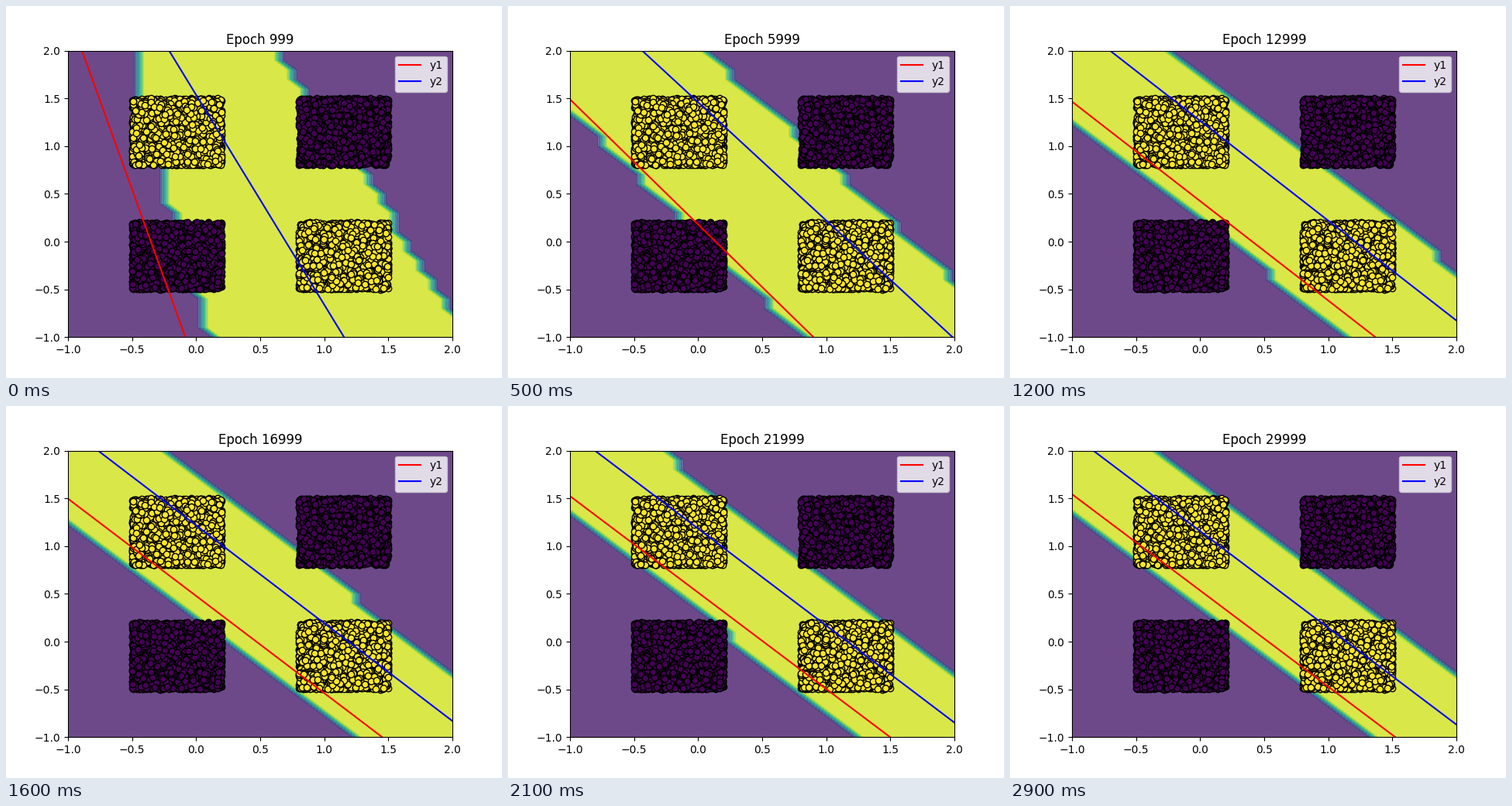
These frames come from a looping animation (640 by 480 pixels, 3 s). A matplotlib script:

```python
import numpy as np
import matplotlib.pyplot as plt
from matplotlib.animation import FuncAnimation

FRAMES = 30
STEP = 1000  # epochs per frame
PER_CLUSTER = 2500


def hidden_lines(n):
    """Intercept and slope of both lines x = c - s*y after n steps."""
    red = (.54 - 1.047 * np.exp(-.159 * n),
           .992 * np.tanh(.13 + .148 * n))
    blue = (1.12 + .335 * np.exp(-.091 * n) - 1.016 * np.exp(-.335 * n),
            .988 * np.tanh(.368 + .13 * n))
    return red, blue


def class_edges(n, y):
    """Band borders: parallel to the lines, slightly bent at the start."""
    (c1, s1), (c2, s2) = hidden_lines(n)
    fade = np.exp(1 - n)
    lower = c1 - s1 * y - .211 + .567 * np.exp(-.26 * n)
    lower += fade * (.05 * y + .023 * y ** 2)
    upper = c2 - s2 * y + .481 + .0012 * n
    upper += fade * (.464 - .015 * y - .026 * y ** 2)
    return lower, upper


fig, ax = plt.subplots(figsize=(6.4, 4.8), dpi=100)
axis = np.linspace(-1, 2, 31)
gx, gy = np.meshgrid(axis, axis)

# Four square clusters labelled as XOR
rng = np.random.default_rng(4)
for x in (-.5, .8):
    for y in (-.5, .8):
        px, py = rng.uniform(0, .7, (2, PER_CLUSTER))
        color = plt.cm.viridis(1.0 if x != y else 0.0)
        ax.scatter(x + px, y + py, color=color, edgecolors="k", zorder=1)

lines = [ax.plot([], [], color, label=name)[0]
         for color, name in (("r", "y1"), ("b", "y2"))]
ax.set(xlim=(-1, 2), ylim=(-1, 2))
ax.legend(loc="upper right")
title = ax.set_title("")
regions = []


def draw(frame):
    n = frame + 1
    while regions:
        regions.pop().remove()
    lower, upper = class_edges(n, gy)
    inside = (gx > lower) & (gx < upper)
    regions.append(ax.contourf(gx, gy, inside.astype(float),
                               alpha=.8, zorder=0))
    for line, (c, s) in zip(lines, hidden_lines(n)):
        line.set_data(axis, (c - axis) / s)
    ax.set(xlim=(-1, 2), ylim=(-1, 2))
    title.set_text(f"Epoch {n * STEP - 1}")
    return [*lines, title]


anim = FuncAnimation(fig, draw, frames=FRAMES, interval=100,
                     init_func=lambda: draw(0), repeat=True, repeat_delay=0)
plt.show()
```
